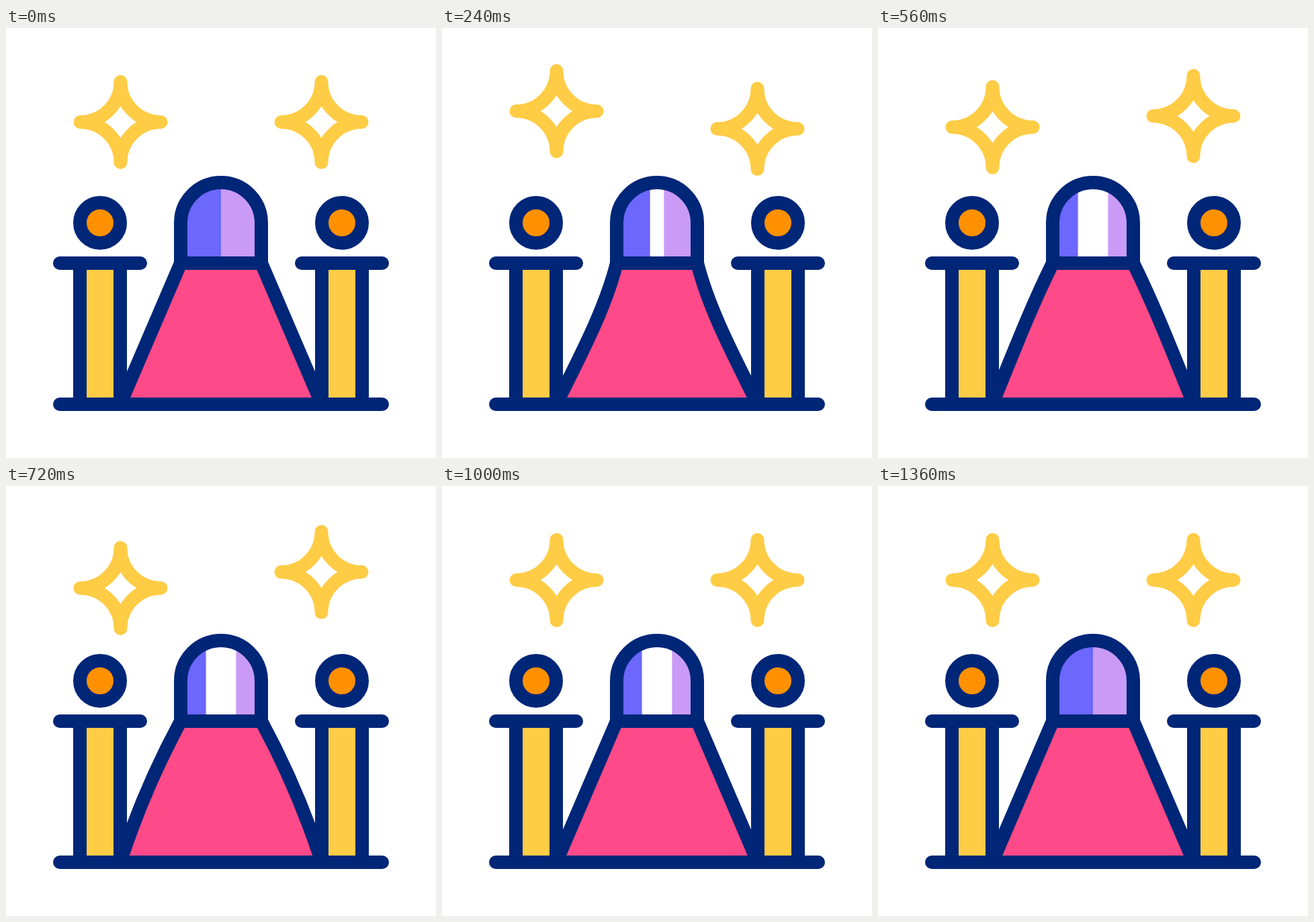
An HTML page for the animation above (1480 ms loop, 640x640 px).

```html
<!DOCTYPE html>
<html lang="en">
<head>
<meta charset="utf-8">
<title>Red carpet</title>
<style>
  html, body { margin: 0; width: 100%; height: 100%; overflow: hidden; background: #fff; }
  svg { display: block; width: 100%; height: 100%; }
  .line { fill: none; stroke: #002678; stroke-width: 20; stroke-linecap: round; stroke-linejoin: round; }
  .star { fill: none; stroke: #fecc45; stroke-width: 20; stroke-linejoin: round; }
</style>
</head>
<body>
<svg viewBox="0 0 640 640">
  <defs>
    <clipPath id="arch"><path d="M260 350V290a60 60 0 0 1 120 0V350z"/></clipPath>
    <path id="sparkle" d="M0-60A60 60 0 0 0 60 0A60 60 0 0 0 0 60A60 60 0 0 0-60 0A60 60 0 0 0 0-60z"/>
    <g id="post">
      <path fill="#fecc45" d="M-30 350h60v210h-60z"/>
      <path class="line" d="M-60 350H60M-30 350V560M30 350V560"/>
      <circle class="line" cy="290" r="30" style="fill:#ff9100"/>
    </g>
  </defs>
  <use id="starL" class="star" href="#sparkle"/>
  <use id="starR" class="star" href="#sparkle"/>
  <g clip-path="url(#arch)">
    <rect id="doorL" x="260" y="220" width="60" height="130" fill="#6c67fd"/>
    <rect id="doorR" x="320" y="220" width="60" height="130" fill="#c99bf6"/>
  </g>
  <path id="carpet" class="line" style="fill:#fe4a88"/>
  <path class="line" d="M260 350V290a60 60 0 0 1 120 0V350z"/>
  <use href="#post" x="140"/>
  <use href="#post" x="500"/>
  <path class="line" d="M80 560H560"/>
</svg>
<script>
const LOOP = 1480, STEP = 40;
const el = id => document.getElementById(id);
const move = (id, x, y) => el(id).setAttribute('transform', `translate(${x} ${y})`);

// Smooth 0..1 ramp between two times
function ramp(t, from, to) {
  const u = Math.min(1, Math.max(0, (t - from) / (to - from)));
  return u * u * (3 - 2 * u);
}

// Swing from rest to a, over to b, and back to rest
const swing = (t, a, b) =>
  a * ramp(t, 120, 320) + (b - a) * ramp(t, 320, 640) - b * ramp(t, 640, 1000);

function draw(t) {
  move('starL', 170.5, 140 + swing(t, -25, 13.6));
  move('starR', 469.5, 140 + swing(t, 15.5, -13.6));

  const gap = 22.4 * (ramp(t, 120, 373) - ramp(t, 1107, 1360));
  move('doorL', -gap, 0);
  move('doorR', gap, 0);

  // The lower part of the carpet edge lags behind the upper part
  const upper = swing(t, 19, -9), lower = swing(t - 40, 13, -7.5);
  el('carpet').setAttribute('d',
    `M260 350C${230 + upper} 420 ${200 + lower} 490 170 560H470` +
    `C${440 - lower} 490 ${410 - upper} 420 380 350z`);
}

function tick(now) {
  draw(Math.floor(now % LOOP / STEP) * STEP);
  requestAnimationFrame(tick);
}
draw(0);
requestAnimationFrame(tick);
</script>
</body>
</html>
```
